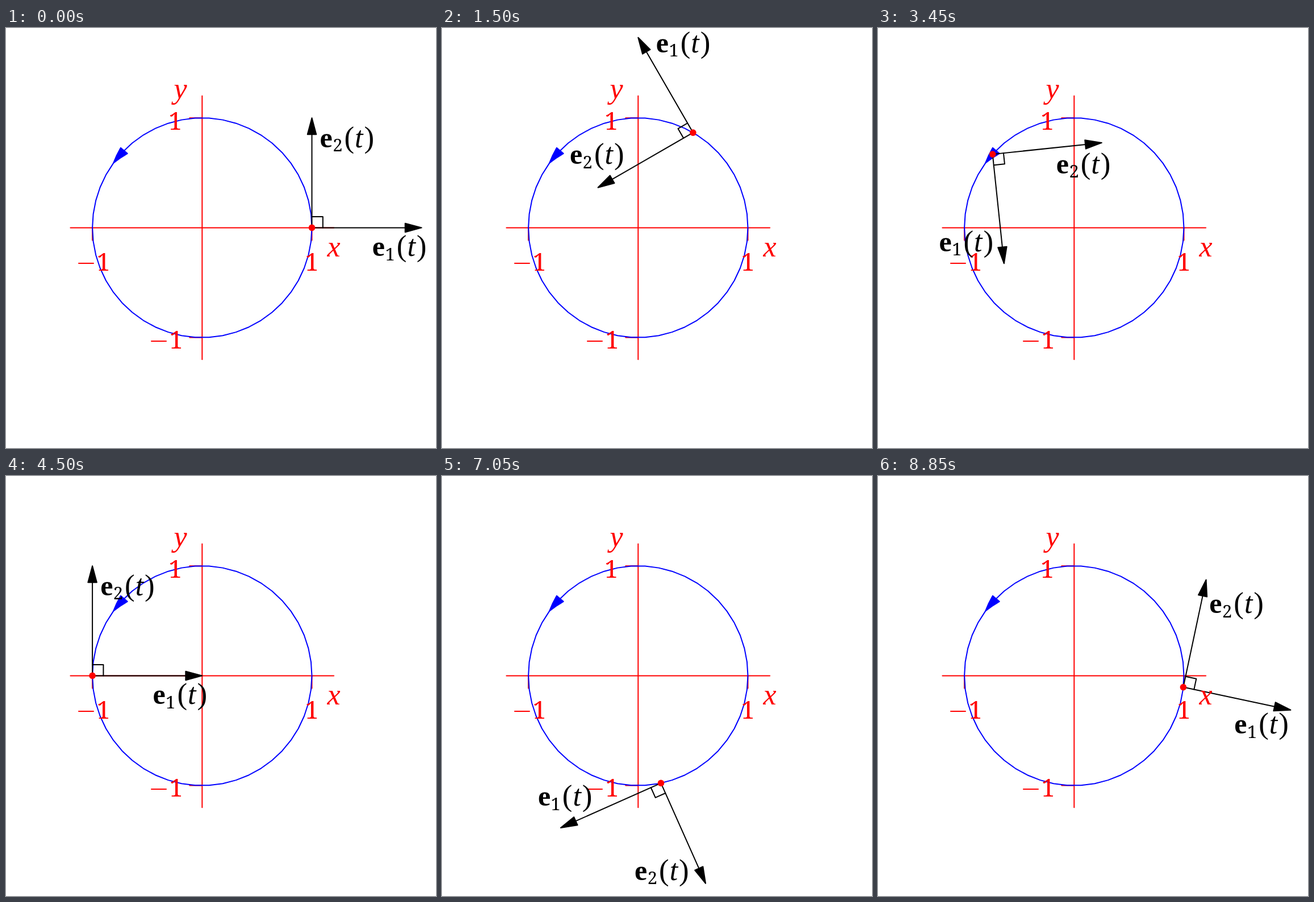
An HTML page for the animation above (9000 ms loop, 757 by 739 pixels).

```html
<!DOCTYPE html>
<html lang="en">
<head>
<meta charset="utf-8">
<title>Rotating frame on a circle</title>
<style>
  html, body { margin: 0; width: 100%; height: 100%; overflow: hidden; background: #fff; }
  svg { display: block; width: 757px; height: 739px; }
  text { text-anchor: middle; font-family: "Liberation Serif", "Times New Roman", serif; font-size: 52px; }
  .line { fill: none; stroke-width: 2; stroke-linejoin: round; stroke-linecap: round; }
  .head { stroke-width: 2; stroke-linejoin: round; }
  .red { stroke: #f00; }
  .blue { stroke: #00f; }
  .black { stroke: #000; }
  .digit { font-family: "Noto Serif", serif; font-size: 43px; }
  .sub { font-family: "Noto Serif", serif; font-size: 31px; }
  .bold { font-weight: bold; font-size: 50px; }
  .italic { font-style: italic; }
  .paren { font-size: 53px; }
  #names { fill: #f00; }
</style>
</head>
<body>
<svg viewBox="0 0 757 739">
  <g id="plane"></g>
  <g id="arrows"></g>
  <circle id="dot" r="5.8" fill="#f00"/>
  <g id="names"></g>
  <g id="labels"></g>
</svg>
<script>
const CX = 345.3, CY = 351.4, R = 193.2;
const STEPS = 60, STEP_MS = 150;
const HEAD = 30, HEAD_ANGLE = 15;
const LABEL_W = 96.5, LABEL_H = 46, LABEL_GAP = 14;

const $ = id => document.getElementById(id);

function add(parent, tag, attrs, text) {
  const el = document.createElementNS("http://www.w3.org/2000/svg", tag);
  for (const key in attrs) el.setAttribute(key, attrs[key]);
  if (text) el.textContent = text;
  parent.appendChild(el);
  return el;
}

// Angles are in degrees, counter-clockwise; y points down on screen.
const unit = deg => {
  const a = deg * Math.PI / 180;
  return [Math.cos(a), -Math.sin(a)];
};
const move = ([x, y], deg, dist) => {
  const [ux, uy] = unit(deg);
  return [x + ux * dist, y + uy * dist];
};
const onCircle = deg => move([CX, CY], deg, R);
const poly = points => "M" + points.map(p => p.map(v => v.toFixed(2)).join(",")).join("L");

function drawPlane() {
  const g = $("plane");
  const line = (cls, d) => add(g, "path", { class: "line " + cls, d });
  const axis = 1.2 * R, tick = 22;
  line("red", `M${CX - axis},${CY}h${2 * axis}M${CX},${CY - axis}v${2 * axis}`);
  for (const s of [-1, 1]) {
    line("red", `M${CX + s * R},${CY}v${tick}M${CX},${CY + s * R}h${-tick}`);
  }
  const sides = 50;
  line("blue", poly(Array.from({ length: sides }, (_, i) => onCircle(i * 360 / sides))) + "Z");

  // Curved arrowhead: the arc behind the tip, turned both ways about it.
  const tip = onCircle(144);
  const back = 54 - HEAD / R * 90 / Math.PI;
  const a = move(tip, back + HEAD_ANGLE, HEAD), b = move(tip, back - HEAD_ANGLE, HEAD);
  add(g, "path", {
    class: "head blue", fill: "#00f",
    d: `M${tip}A${R},${R} 0 0 1 ${a}L${b}A${R},${R} 0 0 0 ${tip}Z`
  });
}

function drawNames() {
  const g = $("names");
  const write = (x, y, cls, text) => add(g, "text", { x, y, class: cls }, text);
  const minus = (x, y) => add(g, "path", { class: "line red", d: `M${x},${y}h26` });
  write(538.5, 427, "digit", "1");
  write(171.5, 427, "digit", "1");
  write(298, 179, "digit", "1");
  write(299.5, 564, "digit", "1");
  minus(128, 414);
  minus(256, 551);
  write(577, 402, "italic", "x");
  write(307, 124, "italic", "y");
}

function makeArrow(index) {
  const shaft = add($("arrows"), "path", { class: "line black" });
  const head = add($("arrows"), "path", { class: "head black" });
  const label = add($("labels"), "g", {});
  const glyphs = [
    [-35.7, 13, "bold", "e"],
    [-15.5, 20.5, "sub", index],
    [5, 13, "paren", "("],
    [22, 13, "italic", "t"],
    [40, 13, "paren", ")"]
  ];
  for (const [x, y, cls, text] of glyphs) add(label, "text", { x, y, class: cls }, text);

  return (from, deg) => {
    const tip = move(from, deg, R);
    shaft.setAttribute("d", poly([from, move(from, deg, R - HEAD * 0.8)]));
    head.setAttribute("d", poly([tip,
      move(tip, deg + 180 + HEAD_ANGLE, HEAD),
      move(tip, deg + 180 - HEAD_ANGLE, HEAD)]) + "Z");

    // The label box sits to the right of the arrow, touching its margin.
    const [ux, uy] = unit(deg - 90);
    const k = 0.5 / Math.max(Math.abs(ux), Math.abs(uy));
    const [px, py] = move(from, deg, 0.8 * R);
    const x = px + ux * (k * LABEL_W + LABEL_GAP) - 1.4;
    const y = py + uy * (k * LABEL_H + LABEL_GAP);
    label.setAttribute("transform", `translate(${x.toFixed(2)} ${y.toFixed(2)})`);
  };
}

drawPlane();
drawNames();
const first = makeArrow("1"), second = makeArrow("2");
const corner = add($("arrows"), "path", { class: "line black" });

function pose(step) {
  const theta = step * 360 / STEPS, turn = 2 * theta;
  const p = onCircle(theta), side = 0.1 * R;
  first(p, turn);
  second(p, turn + 90);
  const a = move(p, turn, side);
  corner.setAttribute("d", poly([a, move(a, turn + 90, side), move(p, turn + 90, side)]));
  $("dot").setAttribute("cx", p[0]);
  $("dot").setAttribute("cy", p[1]);
}

const start = performance.now();
function tick() {
  const time = Math.max(0, performance.now() - start);
  pose(Math.floor(time / STEP_MS) % STEPS);
  requestAnimationFrame(tick);
}
tick();
</script>
</body>
</html>
```
